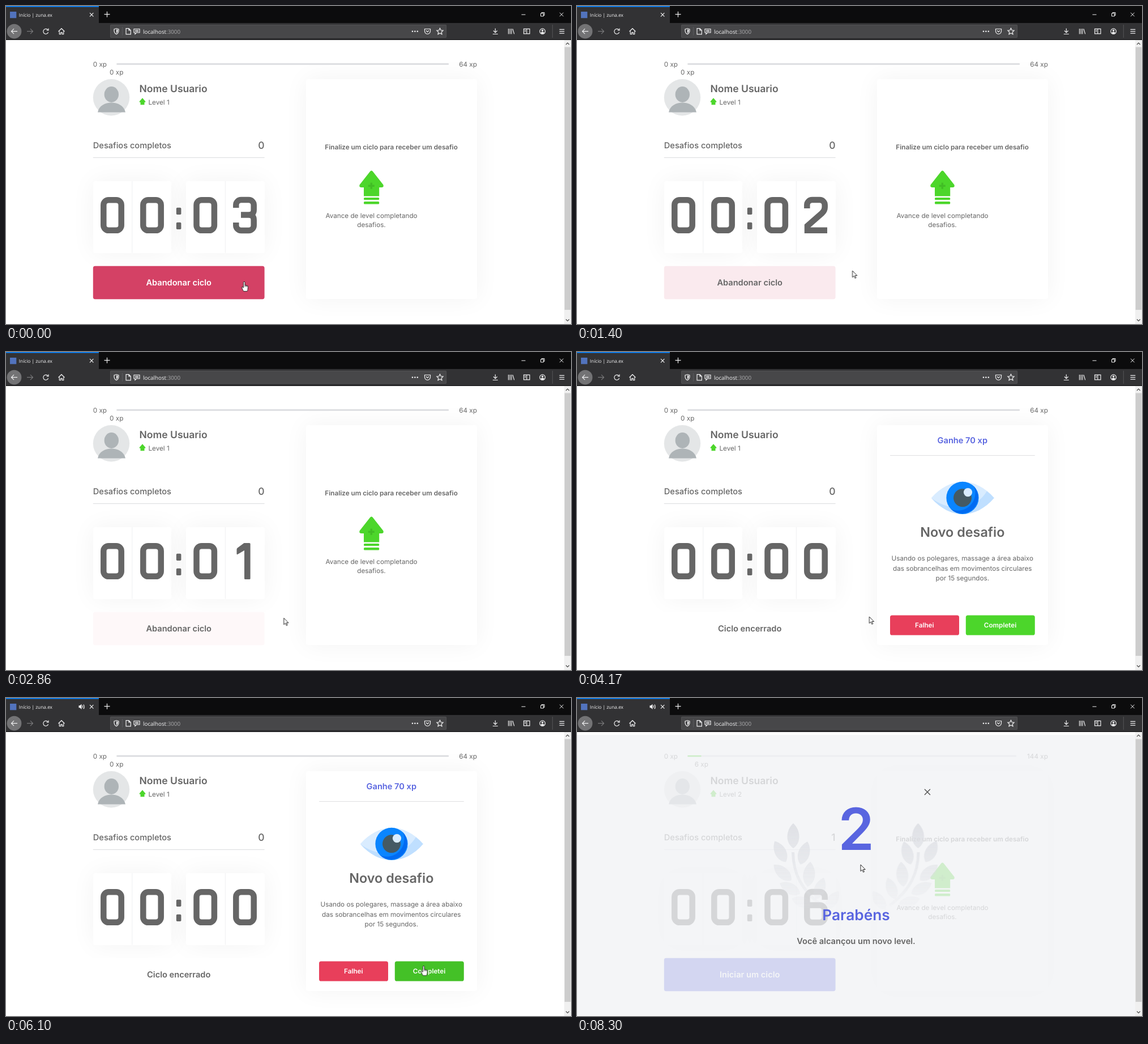
These frames come from a looping animation (998x561 px, 8.38 s). An HTML page:

```html
<!DOCTYPE html>
<html lang="pt-BR">
<head>
<meta charset="utf-8">
<title>Início | zuna.ex</title>
<style>
html, body { margin: 0; width: 100%; height: 100%; overflow: hidden; background: #fff; }
.stage { position: relative; width: 998px; height: 561px; overflow: hidden; }
.card { position: absolute; background: #fff; border-radius: 4px; box-shadow: 0 0 44px rgba(0, 0, 0, .05); }
svg { position: absolute; left: 0; top: 0; }
text { font-family: Inter, "Liberation Sans", sans-serif; font-size: 11.69px; fill: #666; text-rendering: geometricPrecision; }
.ui text { font-family: "Open Sans", "Noto Sans", sans-serif; fill: #f4f4f5; }
.mid { text-anchor: middle; }
.end { text-anchor: end; }
.med { font-weight: 500; }
.semi { font-weight: 600; }
.s15 { font-size: 14.61px; }
.s18 { font-size: 17.53px; }
.white { fill: #fff; }
.blue { fill: #5965e0; }
.num { fill: none; stroke: #666; stroke-width: 10.5; }
.line { fill: none; stroke: #f0f0f1; stroke-width: 1.2; }

/* Scene switches */
.three, .two, .one, .quest, .idle, .run, .early, .level, .audio, .hand, .arrow {
  animation: 8.38s step-end infinite;
}
.three { animation-name: three; }
.two { animation-name: two; }
.one { animation-name: one; }
.quest { animation-name: quest; }
.idle { animation-name: idle; }
.run { animation-name: run; }
.early { animation-name: early; }
.level { animation-name: level; }
.audio { animation-name: audio; }
.hand { animation-name: hand; }
.arrow { animation-name: arrow; }
@keyframes three { 0% { opacity: 1 } 10.02%, 100% { opacity: 0 } }
@keyframes two { 0% { opacity: 0 } 10.02% { opacity: 1 } 22.2%, 100% { opacity: 0 } }
@keyframes one { 0% { opacity: 0 } 22.2% { opacity: 1 } 35.08%, 100% { opacity: 0 } }
@keyframes quest { 0% { opacity: 0 } 35.08% { opacity: 1 } 75.66%, 100% { opacity: 0 } }
@keyframes idle { 0% { opacity: 1 } 35.08% { opacity: 0 } 75.66%, 100% { opacity: 1 } }
@keyframes run { 0% { opacity: 1 } 35.08%, 100% { opacity: 0 } }
@keyframes early { 0% { opacity: 1 } 75.66%, 100% { opacity: 0 } }
@keyframes level { 0% { opacity: 0 } 75.66%, 100% { opacity: 1 } }
@keyframes audio { 0% { opacity: 0 } 50.72%, 100% { opacity: 1 } }
@keyframes hand { 0% { opacity: 1 } 14.86% { opacity: 0 } 69.2% { opacity: 1 } 75.66%, 100% { opacity: 0 } }
@keyframes arrow { 0% { opacity: 0 } 14.86% { opacity: 1 } 69.2% { opacity: 0 } 75.66%, 100% { opacity: 1 } }

/* Hover fades */
.main { animation: main 8.38s linear infinite; }
@keyframes main {
  0%, 14.86% { fill: #d44165 }
  16.9%, 22.2% { fill: #fefbfb }
  26%, 35.07% { fill: #fef8f9 }
  35.08%, 75.65% { fill: #fff }
  75.66%, 100% { fill: #5965e0 }
}
.quit { animation: quit 8.38s linear infinite; }
@keyframes quit { 0%, 14.86% { fill: #fff } 16.7%, 100% { fill: #666 } }
.done { animation: done 8.38s linear infinite; }
@keyframes done { 0%, 69.2% { fill: #4cd62b } 71.6%, 100% { fill: #44c127 } }

.cursor { animation: move 8.38s linear infinite; }
@keyframes move {
  0%, 12.77% { transform: translate(420.7px, 487px) }
  16.7% { transform: translate(486.5px, 467px) }
  18.6%, 22.2% { transform: translate(490px, 469px) }
  34.1%, 40.6% { transform: translate(490.7px, 469.3px) }
  43.5% { transform: translate(458px, 474px) }
  47% { transform: translate(512px, 468px) }
  49.76%, 50.7% { transform: translate(516.3px, 467px) }
  52.5% { transform: translate(535px, 471px) }
  59.07% { transform: translate(680px, 428px) }
  60.86%, 63.6% { transform: translate(692.3px, 427.6px) }
  64.56%, 66.35% { transform: translate(698px, 427.4px) }
  69.2% { transform: translate(715px, 464px) }
  73.87%, 89.86% { transform: translate(744.3px, 476px) }
  93% { transform: translate(660px, 382px) }
  97% { transform: translate(530px, 283px) }
  99.05%, 100% { transform: translate(501px, 294px) }
}
</style>
</head>
<body>
<div class="stage">
<div class="card" style="left:153.8px;top:308.8px;width:138.5px;height:126.8px"></div>
<div class="card" style="left:318px;top:308.8px;width:138.6px;height:126.8px"></div>
<div class="card" style="left:529.8px;top:129px;width:302px;height:388.3px"></div>

<svg width="998" height="561" viewBox="0 0 998 561">
<defs>
  <rect id="n0" class="num" x="-15.7" y="5.2" width="31.4" height="53.6" rx="9"/>
  <path id="n1" fill="#666" d="M-1.5 0H8Q9.6 0 9.6 1.6V62.4Q9.6 64 8 64H.6Q-1 64-1 62.4V13L-13 20Q-14.5 20.500-14.500 19V11.500Q-14.500 9.500-13 8.500Z"/>
  <path id="n2" class="num" d="M-15.7 20V14a9 9 0 0 1 9-9H6.700a9 9 0 0 1 9 9V18q0 6-5 10.500L-15 51V58.800H20"/>
  <path id="n3" class="num" d="M-15.7 19V14a9 9 0 0 1 9-9H6.700a9 9 0 0 1 9 9V22.500q0 9-9 9H-7H6.700q9 0 9 9V50a9 9 0 0 1-9 9H-6.700a9 9 0 0 1-9-9V45"/>
  <path id="n6" class="num" d="M15.700 19V14a9 9 0 0 0-9-9H-6.700a9 9 0 0 0-9 9V50a9 9 0 0 0 9 9H6.700a9 9 0 0 0 9-9V37.500a9 9 0 0 0-9-9H-15.700"/>
  <path id="leaf" d="M0-22C14-9 14 13 0 22C-14 13-14-9 0-22Z"/>
  <g id="branch">
    <path d="M381.500 272C382 310 396 338 432 366" fill="none" stroke="#dcdee3" stroke-width="5"/>
    <use href="#leaf" transform="translate(382 243)"/>
    <use href="#leaf" transform="translate(401 273.500) rotate(17) scale(.96)"/>
    <use href="#leaf" transform="translate(359 271) rotate(-28) scale(.95)"/>
    <use href="#leaf" transform="translate(363 308) rotate(-48) scale(.95)"/>
    <use href="#leaf" transform="translate(410 311) rotate(6)"/>
    <use href="#leaf" transform="translate(376 336) rotate(-62) scale(.92)"/>
    <use href="#leaf" transform="translate(429 336) rotate(20) scale(.92)"/>
    <use href="#leaf" transform="translate(398 360) rotate(-72) scale(.9)"/>
    <use href="#leaf" transform="translate(451 357) rotate(35) scale(.9)"/>
  </g>
  <linearGradient id="fade" x1="0" y1="0" x2="0" y2="1">
    <stop offset="0" stop-color="#fff"/><stop offset="1" stop-color="#000"/>
  </linearGradient>
  <mask id="dim" maskUnits="userSpaceOnUse" x="340" y="215" width="305" height="172">
    <rect x="340" y="215" width="305" height="172" fill="url(#fade)"/>
  </mask>
</defs>

<!-- Experience bar -->
<text x="153.800" y="106.700">0 xp</text>
<g class="early">
  <rect x="195.200" y="100.900" width="587" height="2.900" rx="1.400" fill="#dcdde0"/>
  <text class="mid" x="195.200" y="121.400">0 xp</text>
  <text class="end" x="831.800" y="106.700">64 xp</text>
  <text x="251.500" y="173.800">Level 1</text>
  <text class="end med s18" x="456.600" y="251.600">0</text>
</g>
<g class="level">
  <rect x="195.200" y="100.900" width="581" height="2.900" rx="1.400" fill="#dcdde0"/>
  <rect x="195.200" y="100.900" width="24.500" height="2.900" rx="1.400" fill="#4cd62b"/>
  <text class="mid" x="219.800" y="121.400">6 xp</text>
  <text class="end" x="831.800" y="106.700">144 xp</text>
  <text x="251.500" y="173.800">Level 2</text>
  <text class="end med s18" x="456.600" y="251.600">1</text>
</g>

<!-- Profile -->
<circle cx="186" cy="161.300" r="32.200" fill="#e4e6e7"/>
<g fill="#aeb4b7">
  <ellipse cx="186.300" cy="156" rx="12.700" ry="13.900"/>
  <path d="M162 187.600C164 176 175 170.500 186.300 170.500S208.500 176 211 187.600Z"/>
</g>
<text class="semi s18" x="235.500" y="152">Nome Usuario</text>
<path fill="#4cd62b" d="M241 162.300L246.400 168.600Q246.800 169.600 245.700 169.700H244.500V174.200H237.500V169.700H236.300Q235.200 169.600 235.600 168.600Z"/>
<text class="med s15" x="153.800" y="250.500">Desafios completos</text>
<rect x="153.800" y="267" width="302.800" height=".8" fill="#d3d4d6"/>

<!-- Timer -->
<g fill="#eeeff1">
  <rect x="222.300" y="309" width="1" height="126.500"/>
  <rect x="386.800" y="309" width="1" height="126.500"/>
</g>
<use href="#n0" x="188" y="337"/>
<use href="#n0" x="258" y="337"/>
<g fill="#666">
  <rect x="300.800" y="355.700" width="8.600" height="12.300" rx="1.800"/>
  <rect x="300.800" y="381.800" width="8.600" height="12.300" rx="1.800"/>
</g>
<use href="#n0" x="352.200" y="337"/>
<use class="three" href="#n3" x="422" y="337"/>
<use class="two" href="#n2" x="422" y="337"/>
<use class="one" href="#n1" x="422" y="337"/>
<use class="quest" href="#n0" x="422" y="337"/>
<use class="level" href="#n6" x="422" y="337"/>

<rect class="main" x="153.800" y="458.800" width="302.800" height="58.400" rx="3.600"/>
<g class="run"><text class="quit mid semi s15" x="305.200" y="493.300">Abandonar ciclo</text></g>
<text class="quest mid semi s15" x="305.200" y="493.300">Ciclo encerrado</text>
<text class="level white mid semi s15" x="305.200" y="493.300">Iniciar um ciclo</text>

<!-- Waiting card -->
<g class="idle">
  <text class="mid semi" x="680.600" y="252.700">Finalize um ciclo para receber um desafio</text>
  <g fill="#4cd62b">
    <path d="M643.200 291.700Q645.500 289.300 647.800 291.700L666.300 315.300Q668 319.600 664 320H659.200V335.600H632V320H627.200Q623 319.600 624.700 315.300Z"/>
    <rect x="632" y="338" width="27.200" height="4" rx="1.500"/>
    <rect x="632" y="344.900" width="27.200" height="4.700" rx="1.500"/>
  </g>
  <path d="M645.300 311.800V322.800M639.800 317.300H650.800" stroke="#41bd25" stroke-width="3.400"/>
  <text class="mid" x="645.500" y="373.600">Avance de level completando</text>
  <text class="mid" x="645.500" y="390">desafios.</text>
</g>

<!-- Challenge card -->
<g class="quest">
  <text class="blue mid semi s15" x="680.800" y="161.200">Ganhe 70 xp</text>
  <rect x="553" y="182" width="255.800" height=".8" fill="#d7d8da"/>
  <path fill="#d9ecff" d="M625.800 257.500C659 219.500 704 219.500 736.800 257.500C704 295.500 659 295.500 625.800 257.500Z"/>
  <path fill="#bfdfff" d="M736.800 257.500C704 295.500 659 295.500 625.800 257.500C655 281 702 282 724 245.500Q731 250.500 736.800 257.500Z"/>
  <circle cx="681" cy="257.300" r="28.600" fill="#0a85ff"/>
  <path fill="#006bf2" d="M701.200 237.100A28.600 28.600 0 0 1 660.800 277.500A31 31 0 0 0 701.200 237.100Z"/>
  <circle cx="681" cy="257.300" r="16" fill="#455a64"/>
  <circle cx="690.500" cy="247.600" r="7.600" fill="#d9ecff"/>
  <text class="mid semi" x="680.800" y="326" style="font-size:23.380px">Novo desafio</text>
  <text class="mid" x="680.800" y="368.200">Usando os polegares, massage a área abaixo</text>
  <text class="mid" x="680.800" y="385.800">das sobrancelhas em movimentos circulares</text>
  <text class="mid" x="680.800" y="403.300">por 15 segundos.</text>
  <rect x="553" y="464.400" width="122" height="35.100" rx="3.600" fill="#e83f5b"/>
  <rect class="done" x="686.800" y="464.400" width="122" height="35.100" rx="3.600"/>
  <text class="white mid semi" x="613.800" y="486.400">Falhei</text>
  <text class="white mid semi" x="747.600" y="486.400">Completei</text>
</g>

<!-- Level-up overlay -->
<g class="level">
  <rect y="65" width="986" height="495" fill="#f2f3f5" opacity=".8"/>
  <g fill="#dcdee3" mask="url(#dim)" opacity=".9">
    <use href="#branch"/>
    <use href="#branch" transform="translate(984.500 0) scale(-1 1)"/>
  </g>
  <text class="blue mid semi" x="493" y="267.800" style="font-size:102.300px">2</text>
  <text class="blue mid semi" x="493" y="392.300" style="font-size:26.300px">Parabéns</text>
  <text class="mid semi s15" x="493" y="433.800">Você alcançou um novo level.</text>
  <path d="M614.300 161.300l9.200 9.200m0-9.200l-9.200 9.200" stroke="#555" stroke-width="1.500" stroke-linecap="round"/>
</g>

<!-- Scrollbar -->
<rect x="986" y="60" width="12" height="501" fill="#f0f0f0"/>
<rect x="986.700" y="72.500" width="10.600" height="463.500" fill="#cdcdcd"/>
<path d="M989 68l2.900-2.900 2.900 2.900M989 552.800l2.900 2.900 2.900-2.900" fill="none" stroke="#505050" stroke-width="1.300"/>

<!-- Browser frame -->
<g class="ui">
  <rect width="998" height="31" fill="#0c0c0d"/>
  <rect y="30" width="998" height="30" fill="#323234"/>
  <rect width="164" height="31" fill="#323234"/>
  <rect width="164" height="1.700" fill="#0a84ff"/>
  <rect y="59" width="998" height="1" fill="#0c0c0d"/>
  <rect x="7" y="10" width="11.300" height="11.300" fill="#5273bd"/>
  <text x="22.800" y="18.700" style="font-size:8.300px">Início | zuna.ex</text>
  <g class="audio">
    <path fill="#f0f0f1" d="M128.500 13.300h2l3-2.600v9.200l-3-2.600h-2Z"/>
    <path class="line" d="M135 13.200q1.500 2.100 0 4.200M136.800 11.500q3 3.800 0 7.600" stroke-width="1"/>
  </g>
  <g class="line">
    <path d="M148 12.200l6.400 6.400m0-6.400l-6.400 6.400M178.500 9.700v10M173.500 14.700h10"/>
    <path stroke-width="1" d="M910.500 15.200h7M978 11.700l6.600 6.600m0-6.600l-6.600 6.600M944.500 13h5v5h-5ZM946 13v-1.500h5v5h-1.500"/>
  </g>
  <circle cx="14.500" cy="44.700" r="12.900" fill="#737375"/>
  <g class="line" stroke-width="1.400">
    <path d="M20 44.700H9.500M14 40.200l-4.500 4.500 4.500 4.500"/>
    <path d="M37 44.700h10.500M43 40.200l4.500 4.500-4.500 4.500" style="stroke:#78787a"/>
    <path d="M74 42.200A4.500 4.500 0 1 0 74.600 46.300M75 39.500v3.500h-3.500"/>
    <path d="M92.500 45l5.500-5.300 5.500 5.300M94.300 44.500v5.200h2.500v-3h2.400v3h2.500v-5.200"/>
  </g>
  <rect x="184" y="33" width="594" height="23" rx="1.500" fill="#474749"/>
  <rect x="184.400" y="33.400" width="593.200" height="22.200" rx="1.300" fill="none" stroke="#58585a" stroke-width=".8"/>
  <path d="M205.500 37v15M965.300 33v23" stroke="#606063" stroke-width=".8"/>
  <g class="line" stroke-width="1.100">
    <path d="M195 39.800l4 1.200v3q-.4 4-4 5.800-3.600-1.800-4-5.800v-3Z"/>
    <path d="M212 39.700h5l3.300 3.300v6.800H212ZM217 39.700v3.300h3.300"/>
    <path d="M226 40.500h10v6.500h-5.500l-2.500 2.500v-2.500h-2ZM228 42.800h6M228 44.800h6"/>
    <path d="M739.500 40.500h10v4q-.6 4.500-5 5-4.400-.5-5-5ZM742 43.200l2.500 2.400 2.500-2.400"/>
    <path d="M766.500 39.200l1.700 3.600 3.900.5-2.900 2.700.8 3.900-3.500-1.900-3.500 1.900.8-3.900-2.900-2.700 3.900-.5Z"/>
    <path d="M864.300 39.500v7M861 43.500l3.300 3.300 3.300-3.300M859.800 49.500h9"/>
    <path d="M887.500 40v9.500M890.200 40v9.500M892.900 40v9.500M895 40.300l2.700 9"/>
    <path d="M914.500 40.300h10.500v8.500h-10.500ZM919.800 40.300v8.500M916 42.800h2.300M916 45h2.300"/>
    <circle cx="947.600" cy="44.700" r="4.800"/>
    <path d="M977.500 41.300h8.800M977.500 44.700h8.800M977.500 48.100h8.800"/>
  </g>
  <g fill="#f0f0f1">
    <circle cx="718" cy="44.700" r="1.300"/><circle cx="722.400" cy="44.700" r="1.300"/><circle cx="726.800" cy="44.700" r="1.300"/>
    <circle cx="947.600" cy="43.300" r="1.700"/><path d="M944.400 48q.3-2.500 3.200-2.500t3.200 2.500q-3.200 2.200-6.400 0Z"/>
    <path d="M195 41.300v7q2.500-1.700 2.600-4.300v-1.900Z"/>
  </g>
  <text x="242" y="48.700" style="font-size:9.800px">localhost<tspan fill="#a9a9ab">:3000</tspan></text>
</g>

<!-- Pointer -->
<g class="cursor" fill="#fff" stroke="#111" stroke-width=".9" stroke-linejoin="round">
  <path class="arrow" d="M0 0V11.600L2.700 9.100L4.600 13.300L6.400 12.500L4.500 8.500H8.200Z"/>
  <g class="hand">
    <path d="M-1.300 .6a1.300 1.300 0 0 1 2.600 0V5.500l4.200 1q1.600.5 1.400 2.200L6.200 13.500q-.3 2.300-1 2.800H-1q-.6-1-1.500-2.200L-4.200 10q-.5-1.600 1-1.500L-1.300 10Z"/>
    <path d="M1.300 5.500v3M3.300 6v2.500M5.200 6.500v2.300" fill="none" stroke-width=".7"/>
  </g>
</g>
</svg>
</div>
</body>
</html>
```
